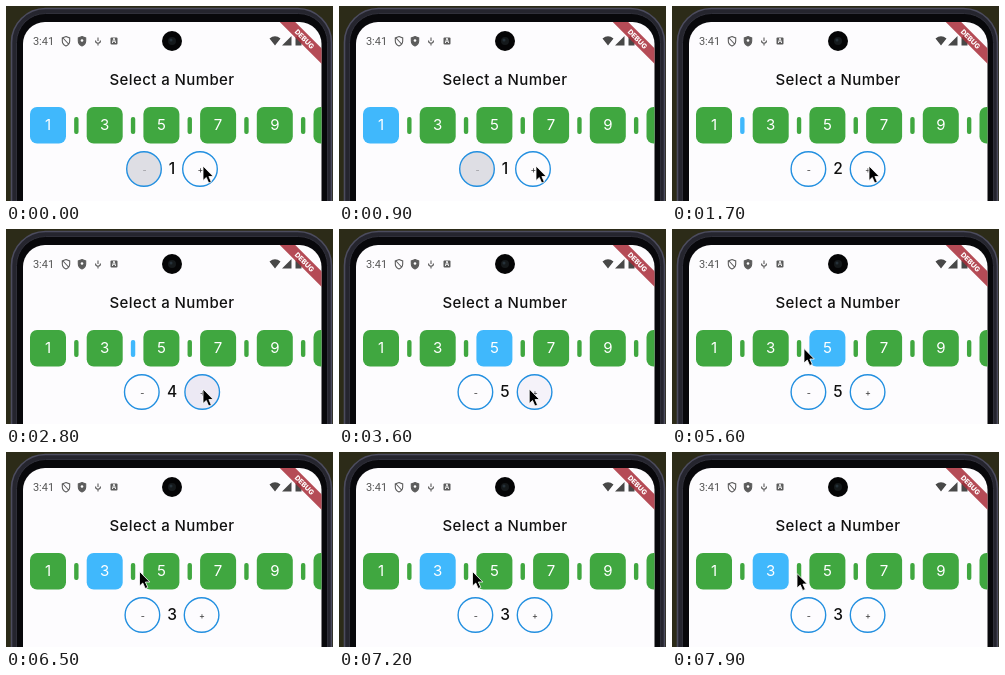
An HTML page that plays this animation: 327x195 px, repeating every 8000 ms.

```html
<!DOCTYPE html>
<html lang="en">
<head>
<meta charset="utf-8">
<title>Number selector</title>
<style>
  html, body { margin: 0; width: 100%; height: 100%; overflow: hidden; background: #2c2b18; }
  svg { display: block; width: 327px; height: 195px; }
  text { font-family: Inter, "Open Sans", sans-serif; text-anchor: middle; }
  .ring { stroke: #2490e0; stroke-width: 1.4; }
  .box text { font-size: 15px; fill: #fff; }
  .status { fill: none; stroke: #5c5c5c; stroke-width: 1.1; }
</style>
</head>
<body>
<svg viewBox="0 0 327 195">
  <defs>
    <clipPath id="screen"><rect x="17" y="16" width="298.5" height="240" rx="22"/></clipPath>
  </defs>
  <rect x="5.500" y="2.500" width="320" height="260" rx="34" fill="#25252e" stroke="#4c4c5e" stroke-width="1.600"/>
  <rect x="10.500" y="7.500" width="311" height="260" rx="29" fill="#08080b" stroke="#30303a"/>
  <g clip-path="url(#screen)">
    <rect x="17" y="16" width="299" height="179" fill="#fdfcfe"/>
    <text x="37.500" y="39" font-size="11" fill="#555" style="font-family:Roboto,sans-serif">3:41</text>
    <g class="status">
      <path d="M60 30.500l3.700 1.400v3q0 3.300-3.700 5-3.700-1.700-3.700-5v-3zM57 32l6 6.500"/>
      <path d="M76 30.500l3.700 1.400v3q0 3.300-3.700 5-3.700-1.700-3.700-5v-3z" fill="#5c5c5c"/>
      <path d="M92 31.500v3.500M89.500 34.500q0 2.700 2.500 2.700t2.500-2.700M92 37v2.500"/>
    </g>
    <circle cx="76" cy="34.500" r="1.300" fill="#fff"/>
    <rect x="104.500" y="31.500" width="7" height="7" rx="1" fill="#5c5c5c"/>
    <text x="108" y="37.300" font-size="6" font-weight="700" fill="#fff">A</text>
    <path d="M263.500 32.500q5.500-4.500 11 0l-5.500 7zM276 39.500h9.500v-9.500z" fill="#484848"/>
    <path d="M289.500 31h1.500v-1.500h3v1.500h1.500v8.500h-6z" fill="#484848"/>
    <circle cx="166" cy="35" r="10" fill="#050506"/>
    <circle cx="166" cy="35" r="4" fill="#15191b"/>
    <circle cx="165" cy="34" r="1.500" fill="#263139"/>
    <text x="166" y="79" font-size="15" font-weight="450" letter-spacing=".4" fill="#111">Select a Number</text>
    <g id="row"></g>
    <circle id="minus" class="ring" cy="163" r="17.300"/>
    <text id="minusText" y="166.500" font-size="9" fill="#333">-</text>
    <text id="value" x="166" y="168.300" font-size="15.500" font-weight="500" fill="#111"></text>
    <circle id="plus" class="ring" cy="163" r="17.300"/>
    <text id="plusText" y="166.500" font-size="9" fill="#333">+</text>
    <g transform="translate(298.500 33) rotate(45)">
      <rect x="-50" y="-5.500" width="100" height="11" fill="#a92f3b" opacity=".86"/>
      <text y="2.500" font-size="7" font-weight="800" fill="#fff">DEBUG</text>
    </g>
  </g>
  <path id="cursor" d="M0 0V14.500L3.300 11.500 5.700 17 8.300 15.900 5.900 10.500H10.300Z" fill="#000" stroke="#fff" stroke-width=".8"/>
</svg>
<script>
const LOOP = 8000;
const $ = id => document.getElementById(id);
const set = (el, attrs) => {
  for (const key in attrs) el.setAttribute(key, attrs[key]);
};

// Odd numbers are boxes, even numbers are the slim bars between them.
let cells = "";
for (let n = 1; n <= 11; n++) {
  const x = 42 + (n - 1) * 28.35;
  cells += n % 2
    ? `<g class="box"><rect x="${x - 18}" y="101" width="36" height="36.5" rx="7"/><text x="${x}" y="124.3">${n}</text></g>`
    : `<rect x="${x - 2.2}" y="111" width="4.4" height="17" rx="2"/>`;
}
$("row").innerHTML = cells;
const shapes = $("row").querySelectorAll("rect");

// [time, selected number, pressed button]
const steps = [
  [0, 1], [1000, 2, "plus"], [2100, 3, "plus"], [2700, 4, "plus"],
  [3300, 5, "plus"], [4300, 4, "minus"], [5400, 5], [6200, 3]
];
// [time, x, y]
const path = [
  [0, 197, 160], [3500, 197, 160], [4000, 133, 160], [4600, 133, 160],
  [5200, 149, 120], [5400, 149, 120], [5600, 132, 119.5], [6000, 105, 119.5],
  [6200, 105, 119.5], [6500, 133.5, 119.5], [7300, 133.5, 119.5], [7800, 125, 121.5], [LOOP, 125, 121.5]
];

function pointAt(t) {
  const i = path.findIndex(p => p[0] > t);
  const [t0, x0, y0] = path[i - 1], [t1, x1, y1] = path[i];
  const u = (t - t0) / (t1 - t0), k = u * u * (3 - 2 * u);
  return [x0 + (x1 - x0) * k, y0 + (y1 - y0) * k];
}

function draw(now) {
  const t = now % LOOP;
  const [start, value, pressed] = steps.filter(s => s[0] <= t).pop();
  // The buttons sit beside the digit, so its width sets their distance.
  const gap = { 1: 28, 4: 30.2 }[value] || 29.6;
  const ripple = Math.max(0, 1 - (t - start) / 500);
  const tint = id => pressed === id ? `rgba(103,80,164,${0.14 * ripple})` : "transparent";

  shapes.forEach((shape, i) => set(shape, { fill: i + 1 === value ? "#40b8fc" : "#40a740" }));
  $("value").textContent = value;
  set($("minus"), { cx: 166 - gap, fill: value === 1 ? "#dedee4" : tint("minus") });
  set($("plus"), { cx: 166 + gap, fill: tint("plus") });
  set($("minusText"), { x: 166 - gap + 0.5, opacity: value === 1 ? 0.4 : 1 });
  set($("plusText"), { x: 166 + gap + 0.5 });
  set($("cursor"), { transform: `translate(${pointAt(t)})` });
}

const begin = performance.now();
function tick() {
  draw(performance.now() - begin);
  requestAnimationFrame(tick);
}
tick();
</script>
</body>
</html>
```
